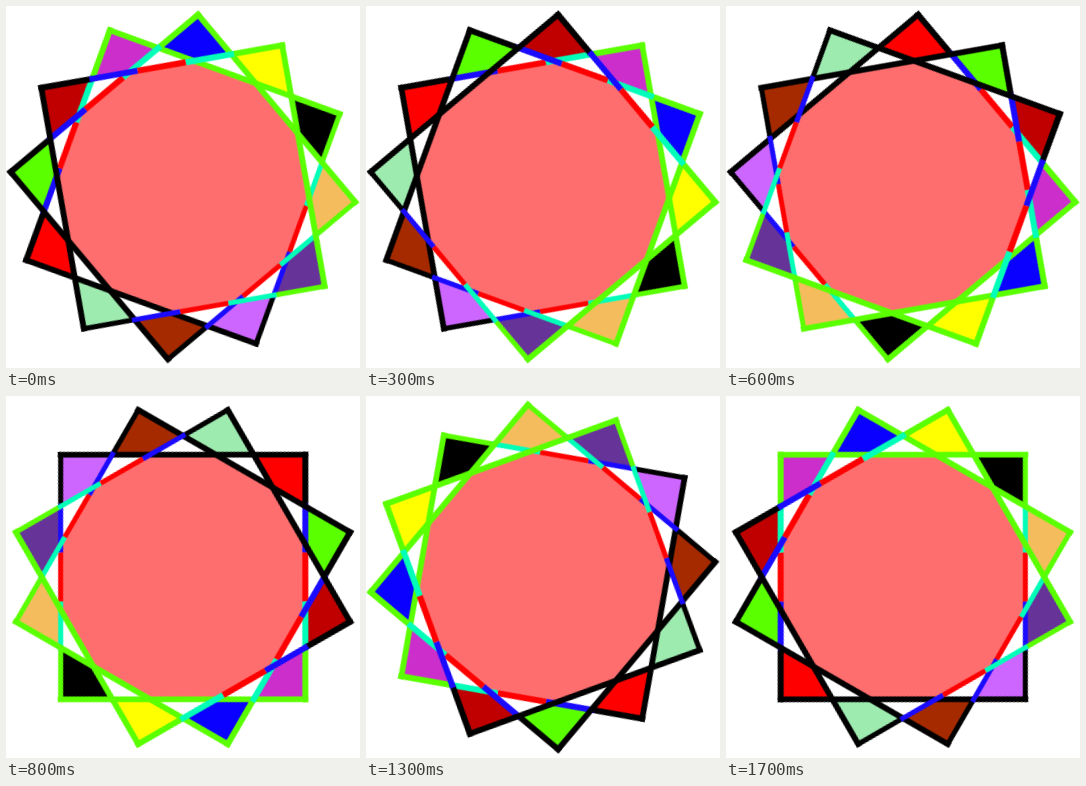
Animation, 354 px wide and 362 px high, one loop 1.8 s. Source, as an HTML page:

```html
<!DOCTYPE html>
<html lang="en">
<head>
<meta charset="utf-8">
<title>Turning star</title>
<style>
  html, body { margin: 0; width: 100%; height: 100%; overflow: hidden; background: #fff; }
  svg { display: block; width: 354px; height: 362px; }
</style>
</head>
<body>
<svg viewBox="0 0 354 362"><g transform="translate(177 181)"><g id="star"></g></g></svg>
<script>
const star = document.getElementById('star');
const R = 173;
const APOTHEM = R * Math.SQRT1_2;
const GREEN = '#5aff00', BLACK = '#000';
const BLEND = [BLACK, '#1a0aff', '#f00', '#00ffb8', GREEN];

// Tip colours, clockwise from the top
const TIPS = ['#0a00ff', '#ff0', '#000', '#f5bc5e', '#663399', '#cc66ff',
              '#a52a00', '#9eebb0', '#f00', '#5aff00', '#c00000', '#cc2ecc'];

const polar = (r, deg) => {
  const a = deg * Math.PI / 180;
  return [r * Math.sin(a), -r * Math.cos(a)];
};
const mix = (p, q, t) => [p[0] + (q[0] - p[0]) * t, p[1] + (q[1] - p[1]) * t];
const tip = i => polar(R, i * 30);

function add(tag, attrs) {
  const el = document.createElementNS('http://www.w3.org/2000/svg', tag);
  for (const k in attrs) el.setAttribute(k, attrs[k]);
  star.append(el);
}

const poly = (points, fill) => add('polygon', { points: points.join(' '), fill });

function line(p, q, stroke, width, cap = 'butt') {
  add('line', {
    x1: p[0], y1: p[1], x2: q[0], y2: q[1],
    stroke, 'stroke-width': width, 'stroke-linecap': cap
  });
}

const isGreen = i => (i + 1) % 12 < 6;

// One side of a square, from tip i to tip i + 3
function side(i) {
  const a = tip(i), b = tip(i + 3);
  const from = isGreen(i), to = isGreen(i + 3);
  if (from === to) return line(a, b, from ? GREEN : BLACK, 5.8, 'square');
  const colors = from ? [...BLEND].reverse() : BLEND;
  const width = from ? 5 : 6;
  for (const k of [0, 4, 1, 2, 3]) {
    line(mix(a, b, k / 5), mix(a, b, (k + 1) / 5), colors[k], width,
         k % 4 ? 'butt' : 'square');
  }
}

const rad = Math.PI / 180;
const inner = APOTHEM / Math.cos(15 * rad);
const notch = APOTHEM / Math.cos(30 * rad);

// Each tip is a kite between its own corner and the crossings beside it
TIPS.forEach((color, i) => {
  const a = i * 30;
  poly([polar(R, a), polar(notch, a + 15), polar(inner, a), polar(notch, a - 15)], color);
});
poly(TIPS.map((_, i) => polar(inner, i * 30)), '#ff6e6e');

for (const first of [2, 0, 1]) {
  for (let i = first; i < 12; i += 3) side(i);
}

star.animate(
  [{ transform: 'rotate(5deg)' }, { transform: 'rotate(365deg)' }],
  { duration: 1800, iterations: Infinity, easing: 'steps(18)' }
);
</script>
</body>
</html>
```
